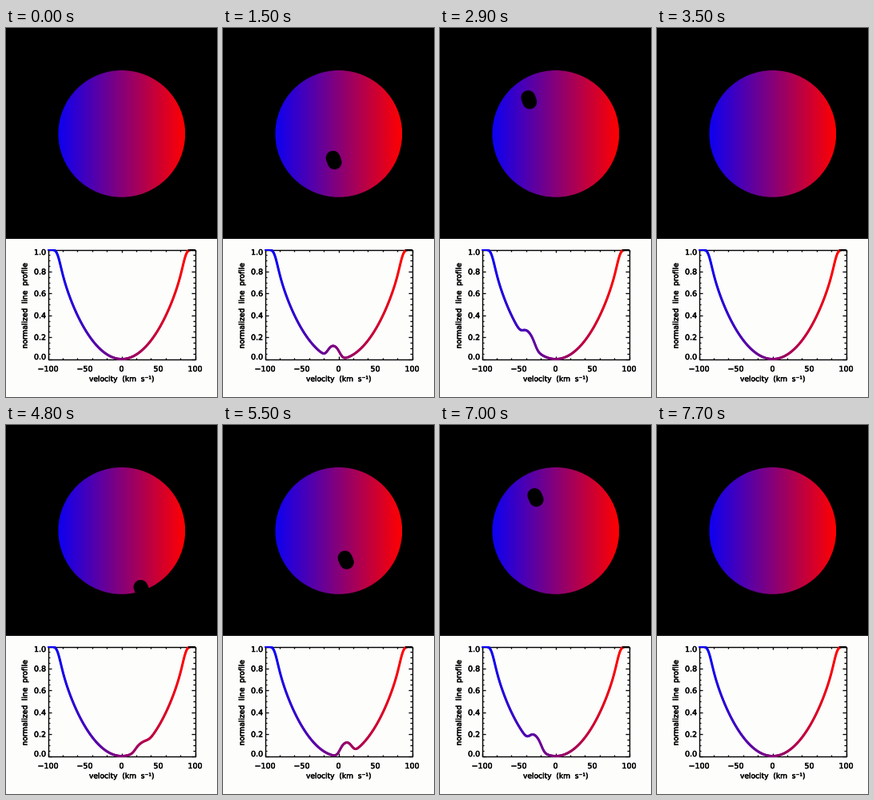
Recreate the animation shown at these times as a matplotlib script. Size 264 by 462 pixels, loop 8.3 s.

```python
import numpy as np
import matplotlib.pyplot as plt
from matplotlib.animation import FuncAnimation
from matplotlib.collections import LineCollection
from matplotlib.patches import Circle, Rectangle
from matplotlib.patheffects import withStroke

W, H, DPI = 264, 462, 100
PX = 72 / DPI                                    # points per pixel
FRAMES, INTERVAL = 83, 100
PAPER = "#fdfdfc"

CX, CY, R = 144.8, 132.4, 79.4                   # stellar disc
SPOT_R = 9.0
LEFT, RIGHT, TOP, BOTTOM = 52.5, 236.5, 277.5, 414.5
LIMB, BLUR = 0.63, 3.1                           # limb darkening, line broadening

# first frame, last frame, reference frame, position there, step per frame
TRANSITS = [
    (6, 34, 15, np.array([138.6, 165.4]), np.array([-1.95, -5.40])),
    (47, 76, 55, np.array([153.7, 169.0]), np.array([-2.28, -5.22])),
]

plt.rcParams["font.family"] = "DejaVu Sans"
fig = plt.figure(figsize=(W / DPI, H / DPI), dpi=DPI, facecolor=PAPER)
ax = fig.add_axes([0, 0, 1, 1])
ax.axis("off")


def doppler(x):
    """Blue to red across the disc."""
    t = 0.05 + 0.95 * np.clip((np.asarray(x) - CX + R) / (2 * R), 0, 1)
    return np.stack([t, 0 * t, 1 - t], axis=-1)


def line(x, y, width=1.3):
    ax.plot(x, y, color="black", lw=width * PX, solid_capstyle="butt")


def label(x, y, text, size=9.5, **kw):
    ax.text(x, y, text, fontsize=size * PX, color="black",
            path_effects=[withStroke(linewidth=0.45 * PX, foreground="black")], **kw)


def draw_star():
    ax.add_patch(Rectangle((0, 0), W, 264, color="black", lw=0))
    columns = np.linspace(CX - R, CX + R, 316)
    disc = ax.imshow(doppler(columns)[None], aspect="auto", zorder=2,
                     extent=(CX - R, CX + R, CY + R, CY - R))
    disc.set_clip_path(Circle((CX, CY), R, transform=ax.transData))


def draw_axes():
    ax.add_patch(Rectangle((LEFT, TOP), RIGHT - LEFT, BOTTOM - TOP,
                           fill=False, ec="black", lw=1.4 * PX))
    for i in range(21):
        x = LEFT + (RIGHT - LEFT) * i / 20
        y = BOTTOM - (BOTTOM - TOP) * i / 20
        if i % 2 == 0:
            size = 3.5 if i % 5 == 0 else 2
            line([x, x], [BOTTOM, BOTTOM - size])
            line([x, x], [TOP, TOP + size])
        size = 4.5 if i % 4 == 0 else 2.5
        line([LEFT, LEFT + size], [y, y])
        line([RIGHT, RIGHT - size], [y, y])
        if i % 5 == 0:
            label(x, 430, f"{10 * i - 100}".replace("-", "\u2212"), ha="center")
        if i % 4 == 0:
            label(50, np.clip(y, 280.5, 411.5) + 3.5, f"{i / 20:.1f}", ha="right")
    label(145, 442.3, "velocity  (km  s\u207b\u00b9)", 9.1, ha="center")
    label(24, 347, "normalized  line  profile", 9.1, rotation=90,
          ha="center", va="center")


pad = 12
xs = np.arange(LEFT - pad, RIGHT + pad + 0.5)
ys = np.arange(CY - R, CY + R, 0.25)
gx, gy = np.meshgrid(xs, ys)
mu2 = 1 - ((gx - CX) ** 2 + (gy - CY) ** 2) / R ** 2
light = np.where(mu2 > 0, 1 - LIMB + LIMB * np.sqrt(np.maximum(mu2, 0)), 0)
kernel = np.exp(-0.5 * (np.arange(-pad, pad + 1) / BLUR) ** 2)
kernel /= kernel.sum()


def flux(pos=None):
    visible = light
    if pos is not None:
        visible = light * (np.hypot(gx - pos[0], gy - pos[1]) > SPOT_R)
    return np.convolve(visible.sum(axis=0), kernel, mode="valid")


full = flux().max()
curve_x = xs[pad:-pad]


def curve_segments(pos=None):
    y = TOP + (BOTTOM - TOP) * flux(pos) / full
    points = np.column_stack([curve_x, y])
    return np.stack([points[:-1], points[1:]], axis=1)


draw_star()
draw_axes()
mid = (curve_x[:-1] + curve_x[1:]) / 2
colors = np.where((mid > CX + R + 5)[:, None], 0, doppler(mid))
curve = LineCollection(curve_segments(), colors=colors, linewidths=3 * PX,
                       capstyle="round", zorder=5)
ax.add_collection(curve)
curve.set_clip_path(Rectangle((LEFT - 0.5, TOP - 1), RIGHT - LEFT + 1,
                              BOTTOM - TOP + 2.5, transform=ax.transData))
spot, = ax.plot([], [], color="black", lw=2 * SPOT_R * PX,
                solid_capstyle="round", zorder=4)
ax.set_xlim(0, W)
ax.set_ylim(H, 0)


def update(frame):
    pos = None
    spot.set_data([], [])
    for first, last, ref, anchor, step in TRANSITS:
        if first <= frame <= last:
            pos = anchor + (frame - ref) * step
            # the spot is smeared along one step of its path
            spot.set_data(*np.column_stack([pos - step / 2, pos + step / 2]))
    curve.set_segments(curve_segments(pos))
    return curve, spot


anim = FuncAnimation(fig, update, frames=FRAMES, interval=INTERVAL,
                     repeat=True, repeat_delay=0)
plt.show()
```
